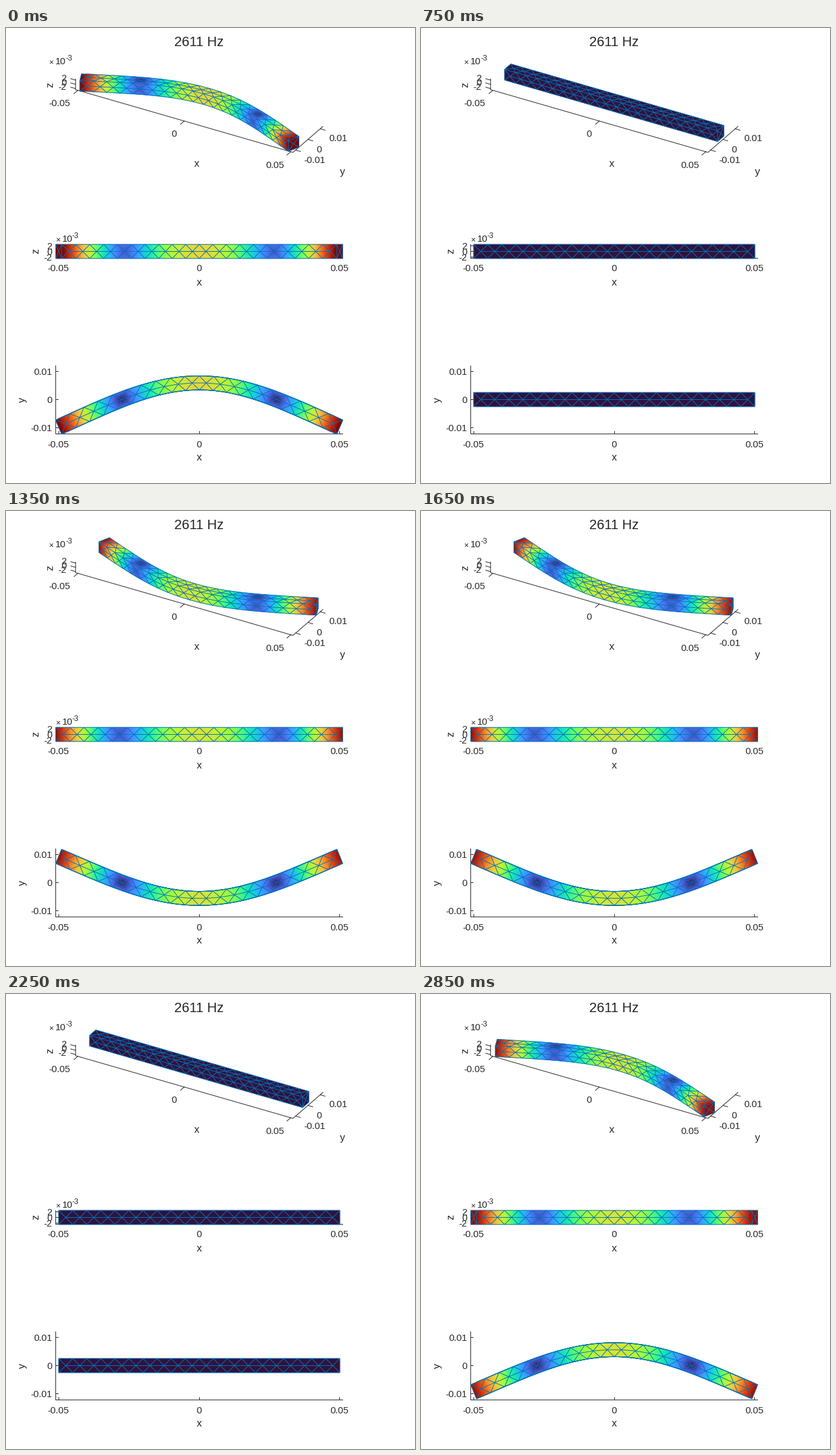
A matplotlib script that plays this animation: 654x728 px, repeating every 3 s.

```python
import numpy as np
import matplotlib.pyplot as plt
from matplotlib.animation import FuncAnimation
from matplotlib.collections import LineCollection, TriMesh
from matplotlib.tri import Triangulation

W, H, DPI = 654, 728, 100
FRAMES, INTERVAL = 20, 150
PX = 72 / DPI
INK = "#262626"
EDGE = "#0072bd"

plt.rcParams["font.family"] = "Liberation Sans"
fig = plt.figure(figsize=(W / DPI, H / DPI), dpi=DPI, facecolor="white")
ax = fig.add_axes([0, 0, 1, 1])
ax.set_xlim(0, W)
ax.set_ylim(H, 0)
ax.axis("off")

# Bar geometry and axis limits in metres
LENGTH, HALF, CELLS = 0.1, 0.0025, 20
XLIM, YLIM = 0.05106, 0.01218
AMP, SHEAR, CMAX = 0.0098, 0.931, 0.0097


# ---- surface mesh ----
def build_mesh():
    """Four long faces with a row of centre nodes, plus two end caps."""
    points, tris = [], []

    def add(*p):
        points.append(p)
        return len(points) - 1

    xs = np.linspace(-LENGTH / 2, LENGTH / 2, CELLS + 1)
    signs = [(-1, -1), (1, -1), (1, 1), (-1, 1)]
    rails = [[add(x, a * HALF, b * HALF) for x in xs] for a, b in signs]
    for i in range(4):
        lo, hi = rails[i], rails[(i + 1) % 4]
        cy, cz = np.add(signs[i], signs[(i + 1) % 4]) * HALF / 2
        mid = [add(x, cy, cz) for x in (xs[:-1] + xs[1:]) / 2]
        for rail in (lo, hi):
            tris += [(rail[k], rail[k + 1], mid[k]) for k in range(CELLS)]
            tris += [(mid[k], mid[k + 1], rail[k + 1]) for k in range(CELLS - 1)]
        tris += [(lo[0], hi[0], mid[0]), (lo[-1], hi[-1], mid[-1])]
    for end in (0, -1):
        hub = add(xs[end], 0, 0)
        tris += [(rails[i][end], rails[(i + 1) % 4][end], hub) for i in range(4)]

    points, tris = np.array(points), np.array(tris)
    corners = points[tris]
    inward = np.sum(normals(corners) * corners.mean(axis=1), axis=1) < 0
    tris[inward] = tris[inward][:, ::-1]
    return points, tris


def normals(corners):
    a, b, c = corners[:, 0], corners[:, 1], corners[:, 2]
    return np.cross(b - a, c - a)


def lattice(n):
    """Barycentric weights and small triangles that split a triangle n by n."""
    index, weights, small = {}, [], []
    for i in range(n + 1):
        for j in range(n + 1 - i):
            index[i, j] = len(weights)
            weights.append((i / n, j / n, (n - i - j) / n))
    for i in range(n):
        for j in range(n - i):
            small.append((index[i, j], index[i + 1, j], index[i, j + 1]))
            if i + j < n - 1:
                small.append((index[i + 1, j], index[i + 1, j + 1], index[i, j + 1]))
    return np.array(weights), np.array(small)


points, tris = build_mesh()
weights, small = lattice(4)


# ---- first bending mode of a free beam ----
def bending_mode(x):
    b = 4.73004 / 2
    s = 2 * x / LENGTH
    ca, ch = np.cos(b), np.cosh(b)
    shape = (np.cos(b * s) / ca + np.cosh(b * s) / ch) / 2
    slope = (-np.sin(b * s) / ca + np.sinh(b * s) / ch) * b / LENGTH
    return shape, slope


shape, slope = bending_mode(points[:, 0])
mode = np.column_stack([points[:, 1] * slope * SHEAR, -shape, 0 * shape]) * AMP
size = np.linalg.norm(mode, axis=1)


# ---- views ----
class View:
    def __init__(self, origin, scale, right, up):
        self.origin = np.array(origin)
        self.axes = scale * np.column_stack([right, -np.array(up)])
        self.toward = np.cross(right, up)

    def project(self, p):
        return self.origin + np.asarray(p) @ self.axes


c30, s30 = np.cos(np.pi / 6), 0.5
iso = View((309, 119.6), 3931, (c30, s30, 0), (-s30 * s30, s30 * c30, c30))
front = View((309, 357.5), 4495, (1, 0, 0), (0, 0, 1))
top = View((309, 594.5), 4495, (1, 0, 0), (0, 1, 0))


def line(*pts):
    xs, ys = zip(*pts)
    ax.plot(xs, ys, color=INK, lw=PX, zorder=1, snap=False,
            solid_capstyle="projecting")


def text(x, y, s, px=15, ha="center", **kw):
    """Place figures by the middle of their height."""
    ax.text(x, y + 0.345 * px, s, fontsize=px * PX, color=INK,
            ha=ha, va="baseline", zorder=2, **kw)


def name(x, y, s, rotation=0):
    ax.text(x, y, s, fontsize=16.5 * PX, color=INK, ha="center",
            va="center", rotation=rotation, zorder=2)


def power(x, y):
    text(x + 0.5, y + 0.5, "×", px=13, ha="left")
    text(x + 10.5, y, "10", ha="left")
    text(x + 27, y - 5.5, "-3", px=12, ha="left")


def tick3d(p, direction, length=8):
    a = iso.project(p)
    d = np.array(direction) @ iso.axes
    line(a, a + d / np.hypot(*d) * length)


def draw_iso_axes():
    x, y, z = XLIM, YLIM, HALF
    line(*iso.project([(-x, -y, z), (-x, -y, -z), (x, -y, -z), (x, y, -z)]))
    for v in (-1, 0, 1):
        tick3d((0.05 * v, -y, -z), (0, -1, 0))
        tick3d((x, 0.01 * v, -z), (1, 0, 0))
        tick3d((-x, -y, 0.002 * v), (-1, 0, 0))
    for px, py, s in [(86, 120, "-0.05"), (269, 169, "0"), (430, 219, "0.05"),
                      (531, 176, "0.01"), (501, 194, "0"), (494, 211, "-0.01")]:
        text(px, py, s)
    for py, s in [(79.5, "2"), (87, "0"), (94, "-2")]:
        text(96.5, py, s, ha="right")
    name(305, 217, "x")
    name(538, 230.5, "y")
    name(71, 91, "z", 90)
    power(68, 53)


def draw_flat_axes(y0, y1, rows, label_y, name_y):
    left, right = 79.5, 538.5
    line((left, y0), (left, y1), (right, y1))
    for x, s in [(84.5, "-0.05"), (309.5, "0"), (533.5, "0.05")]:
        line((x, y1), (x, y1 - 4))
        text(x - 0.5, label_y, s)
    for y, s in rows:
        line((left, y), (left + 4, y))
        text(73.5, y, s, ha="right")
    name(308.5, name_y, "x")


text(309, 21.5, "2611 Hz", px=21.8)
draw_iso_axes()
draw_flat_axes(346.5, 368.5, [(348.5, "2"), (357.5, "0"), (366.5, "-2")], 384, 407)
power(79, 337)
name(48, 357, "z", 90)
draw_flat_axes(540.5, 649.5, [(549.5, "0.01"), (594.5, "0"), (639.5, "-0.01")], 666, 688)
name(26, 594.5, "y", 90)

drawn = []


def draw_bar(view, pos, value):
    corners = pos[tris]
    seen = tris[normals(corners) @ view.toward > 1e-11]
    flat = view.project(pos)[seen]
    fine = np.einsum("wk,tkd->twd", weights, flat).reshape(-1, 2)
    shade = (value[seen] @ weights.T).ravel()
    offset = np.arange(len(seen))[:, None, None] * len(weights)
    mesh = Triangulation(fine[:, 0], fine[:, 1], (small + offset).reshape(-1, 3))

    fill = TriMesh(mesh, cmap="turbo", zorder=3)
    fill.set_array(shade)
    fill.set_clim(0, CMAX)
    pairs = np.sort(seen[:, [0, 1, 1, 2, 2, 0]].reshape(-1, 2), axis=1)
    edges = LineCollection(view.project(pos)[np.unique(pairs, axis=0)],
                           colors=EDGE, linewidths=PX, zorder=4, snap=False)
    for artist in (fill, edges):
        ax.add_collection(artist, autolim=False)
        drawn.append(artist)


def update(frame):
    while drawn:
        drawn.pop().remove()
    swing = np.cos(2 * np.pi * frame / FRAMES)
    pos = points + swing * mode
    for view in (iso, front, top):
        draw_bar(view, pos, abs(swing) * size)
    return drawn


anim = FuncAnimation(fig, update, frames=FRAMES, interval=INTERVAL,
                     init_func=lambda: [], repeat=True, repeat_delay=0, blit=False)
plt.show()
```
